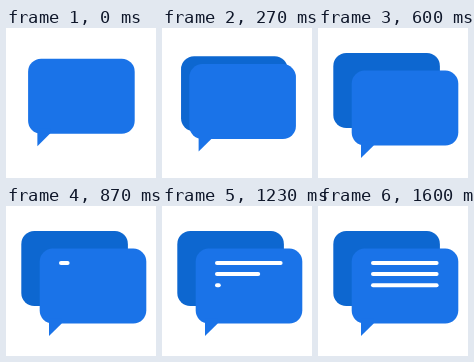
An HTML page with a canvas for the animation above (2810 ms loop, 150x150 px).

```html
<!DOCTYPE html>
<html lang="en">
<head>
<meta charset="utf-8">
<title>Chat bubbles</title>
<style>
  html, body { margin: 0; width: 100%; height: 100%; overflow: hidden; background: #fff; }
  canvas { display: block; width: 100vw; height: 100vh; }
</style>
</head>
<body>
<canvas id="stage"></canvas>
<script>
const SIZE = 150, LOOP = 2810;
const FRONT = '#1a73e8', BACK = '#0d67d0';
const canvas = document.getElementById('stage');
const ctx = canvas.getContext('2d');
const dpr = window.devicePixelRatio || 1;
canvas.width = canvas.height = SIZE * dpr;

// Eased progress of a move that starts at `start` and lasts `span` ms
function progress(t, start, span) {
  const p = Math.min(1, Math.max(0, (t - start) / span));
  return p * p * (3 - 2 * p);
}

// Motion runs at 25 fps and is shown on 30 fps ticks
function stepped(t) {
  const tick = Math.floor((t + 4) * 0.03);
  return Math.ceil(tick * 5 / 6 - 0.5) * 40;
}

function bubble(x, y, color, tail) {
  ctx.fillStyle = color;
  ctx.beginPath();
  ctx.roundRect(x, y, 106.6, 75, 13);
  ctx.fill();
  if (!tail) return;
  ctx.beginPath();
  ctx.moveTo(x + 9.3, y + 70);
  ctx.lineTo(x + 9.3, y + 87.4);
  ctx.lineTo(x + 22, y + 74.8);
  ctx.lineTo(x + 22, y + 70);
  ctx.fill();
}

function textLine(y, p) {
  if (p <= 0) return;
  ctx.beginPath();
  ctx.moveTo(55, y);
  ctx.lineTo(55 + 63.6 * p, y);
  ctx.stroke();
}

function draw(time) {
  const t = stepped(time % LOOP);
  ctx.setTransform(dpr, 0, 0, dpr, 0, 0);
  ctx.fillStyle = '#fff';
  ctx.fillRect(0, 0, SIZE, SIZE);

  const p = progress(t, 0, 600);
  if (p > 0) bubble(22.1 - 6.8 * p, 30.8 - 5.8 * p, BACK, false);
  bubble(22.1 + 11.6 * p, 30.8 + 11.8 * p, FRONT, true);

  ctx.strokeStyle = '#fff';
  ctx.lineWidth = 4;
  ctx.lineCap = 'round';
  for (let i = 0; i < 3; i++) {
    textLine(57 + 11.1 * i, progress(t, 800 + 200 * i, 400));
  }
}

const begin = performance.now();
function loop() {
  draw(performance.now() - begin);
  requestAnimationFrame(loop);
}
loop();
</script>
</body>
</html>
```
